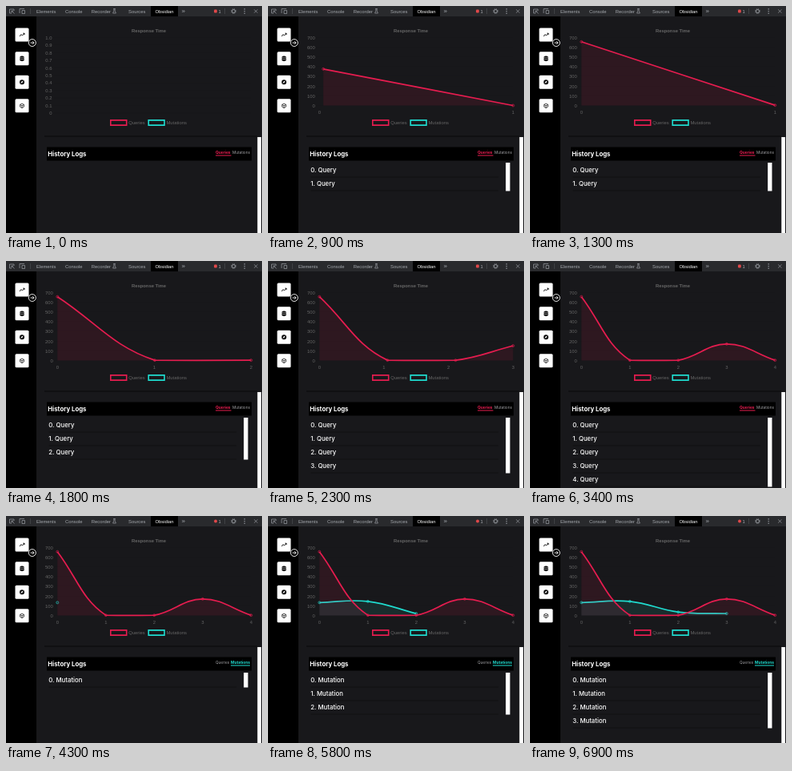
Write an HTML page that moves like this. It is 320 px wide and 284 px high and loops after 7 s.

```html
<!DOCTYPE html>
<html lang="en">
<head>
<meta charset="utf-8">
<title>Response time panel</title>
<style>
  html, body { margin: 0; width: 100%; height: 100%; overflow: hidden; background: #18181b; }
  svg { display: block; width: 320px; height: 284px; }
  text { font: 5.85px "Liberation Sans", Arial, sans-serif; fill: #666; white-space: pre; }
  .bar text { fill: #a4a8ad; }
  .bar .on { fill: #fff; }
  .log text { font: 500 7.8px Inter, sans-serif; fill: #fff; }
  .log .title { font-weight: 700; }
  .log .tab { font-size: 4.7px; font-weight: 400; fill: #a0a0a4; }
  .log .tab.on { font-size: 4.85px; font-weight: 700; fill: var(--c); }
  .mid { text-anchor: middle; }
  .end { text-anchor: end; }
  .line { fill: none; stroke: #a4a8ad; stroke-width: .65; }
  .icon { fill: none; stroke: #000; stroke-width: .9; }
</style>
</head>
<body>
<svg viewBox="0 0 320 284">
  <path d="M0 13H38V284H0z"/>
  <path fill="#08080a" d="M48 162.500H314V163.500H48z"/>

  <g class="bar">
    <path fill="#292a2d" d="M0 0H320V13H0z"/>
    <path d="M181 0H215V13H181z"/>
    <path class="line" d="M7 9H4.500V4H10V6M7 6L10.500 9.500M7 6V8.500M7 6H9.500M17 9V3.500H23M20 5.500H23.500V9.500H20z"/>
    <path stroke="#4a4c50" stroke-width=".7" d="M30.500 3V10M273.500 3V10"/>
    <text x="38" y="8.500">Elements</text>
    <text x="74" y="8.500">Console</text>
    <text x="106.800" y="8.500">Recorder</text>
    <path class="line" d="M134.200 3.500H136.800M134.900 3.500V6L133.600 9H137.400L136.100 6V3.500"/>
    <text x="153" y="8.500">Sources</text>
    <text x="186.500" y="8.500" class="on">Obsidian</text>
    <text x="219.500" y="8.600" style="font-size:8px">»</text>
    <g id="badge"></g>
    <text x="265.600" y="8.500">1</text>
    <circle class="line" cx="284.500" cy="6.500" r="2" style="stroke-width:.9"/>
    <circle class="line" cx="284.500" cy="6.500" r="3" stroke-dasharray="1.200 1.156"/>
    <path fill="#a4a8ad" d="M297.600 3.200h1.200v1.200h-1.200zM297.600 5.900h1.200v1.200h-1.200zM297.600 8.600h1.200v1.200h-1.200z"/>
    <path class="line" d="M310.200 4.400L314.400 8.600M314.400 4.400L310.200 8.600"/>
  </g>

  <g fill="#fff">
    <rect x="11.500" y="27.500" width="17" height="17" rx="1.500"/>
    <rect x="11.500" y="57.200" width="17" height="17" rx="1.500"/>
    <rect x="11.500" y="86.700" width="17" height="17" rx="1.500"/>
    <rect x="11.500" y="116.300" width="17" height="17" rx="1.500"/>
  </g>
  <path class="icon" d="M17 38L19 35.500L20.500 37L23 34.200M21.300 34.200H23V36"/>
  <path d="M17.300 63.500Q20 61.500 22.700 63.500V68Q20 70 17.300 68z"/>
  <path stroke="#fff" stroke-width=".5" fill="none" d="M17 64Q20 66 23 64M17 66Q20 68 23 66"/>
  <circle cx="20" cy="95.200" r="3"/>
  <path fill="#fff" d="M21.700 93.500L20.600 95.800L18.300 96.900L19.400 94.600z"/>
  <path class="icon" style="stroke-width:.7" d="M20 122L22.400 123.400V126.200L20 127.600L17.600 126.200V123.400zM17.600 123.400L20 124.800L22.400 123.400M20 124.800V127.600"/>
  <circle cx="32.800" cy="46" r="4.500" stroke="#fff" stroke-width=".9"/>
  <path fill="none" stroke="#fff" stroke-width=".9" d="M30.500 46H35M33.300 44.200L35.100 46L33.300 47.800"/>

  <text x="178.500" y="33.200" class="mid" style="font-weight:700">Response Time</text>
  <g id="chart"></g>
  <g fill="none" stroke-width="1.600">
    <path stroke="#e61c4f" d="M130.800 142.900H150.700V149.100H130.800z"/>
    <path stroke="#1fdccf" d="M178.200 142.900H198V149.100H178.200z"/>
  </g>
  <text x="153.200" y="148.200">Queries</text>
  <text x="200.500" y="148.200">Mutations</text>

  <g class="log">
    <path d="M51 176.500H307V193.500H51z"/>
    <text x="52.300" y="187.800" class="title">History Logs</text>
    <g id="log"></g>
  </g>
  <path fill="#fff" d="M314.300 164H319V284H314.300z"/>
</svg>

<script>
const LOOP = 7000, DURATION = 520;
const TOP = 39.2, BASE = 124.5, RIGHT = 306.3;
const RED = '#e61c4f', TEAL = '#1fdccf';
const queries = [655, 3, 3, 170, 3];
const mutations = [133, 145, 36, 24];

// start time, number of queries, number of mutations
const steps = [
  [-DURATION, 0, 0], [90, 1, 0], [890, 2, 0], [1420, 3, 0], [2080, 4, 0],
  [2712, 5, 0], [3850, 5, 1], [4880, 5, 2], [5705, 5, 3], [6705, 5, 4]
];

const $ = id => document.getElementById(id);
const clamp = (v, lo, hi) => Math.min(hi, Math.max(lo, v));
const mix = (a, b, p) => a + (b - a) * p;
const text = (x, y, s, cls = '') => `<text x="${x}" y="${y}" class="${cls}">${s}</text>`;

function place(value, i, labels) {
  const left = labels === 1 ? 69.6 : 64.3;
  const [min, max] = labels === 1 ? [654, 656] : [0, 700];
  return {
    x: left + i * (RIGHT - left) / Math.max(labels - 1, 1),
    y: mix(BASE, TOP, (value - min) / (max - min))
  };
}

function points(values, count, oldCount, labels, oldLabels, p) {
  return values.slice(0, count).map((value, i) => {
    const to = place(value, i, labels);
    let from = { x: to.x, y: BASE };
    if (i < oldCount) from = place(value, i, oldLabels);
    else if (i === 4) from.y = place(values[3], 3, labels).y;
    return { x: mix(from.x, to.x, p), y: mix(from.y, to.y, p) };
  });
}

// Control points before and after each point, for a spline of tension 0.4
function handles(pts) {
  return pts.map((c, i) => {
    const a = pts[i - 1] || c, b = pts[i + 1] || c;
    const da = Math.hypot(c.x - a.x, c.y - a.y), db = Math.hypot(b.x - c.x, b.y - c.y);
    const k = 0.4 / (da + db || 1);
    const at = d => `${c.x + d * (b.x - a.x)} ${clamp(c.y + d * (b.y - a.y), TOP, BASE)}`;
    return [at(-k * da), at(k * db)];
  });
}

function series(pts, color) {
  if (!pts.length) return '';
  const h = handles(pts);
  const line = pts.map((c, i) => i
    ? `C${h[i - 1][1]} ${h[i][0]} ${c.x} ${c.y}`
    : `M${c.x} ${c.y}`).join('');
  const area = `${line}L${pts[pts.length - 1].x} ${BASE}L${pts[0].x} ${BASE}z`;
  const dots = pts.map(c =>
    `<circle cx="${c.x}" cy="${c.y}" r="1.5" fill="${color}" fill-opacity=".1" stroke="${color}" stroke-width=".6"/>`);
  return `<path d="${area}" fill="${color}" fill-opacity=".1"/>` +
    `<path d="${line}" fill="none" stroke="${color}" stroke-width="1.7"/>` + dots.join('');
}

function axes(labels) {
  const count = labels < 2 ? 10 : 7;
  const bottom = labels ? BASE : 134;
  const edge = [57.4, 63.6][labels] || 58.7;
  let out = '';
  for (let i = 0; i <= count; i++) {
    const y = mix(bottom, TOP, i / count);
    const label = labels > 1 ? i * 100 : labels ? (654 + i / 5).toFixed(1) : i ? (i / 10).toFixed(1) : 0;
    out += `<path d="M${edge + 1} ${y}H${RIGHT}" stroke="#000" stroke-opacity=".1" stroke-width=".5"/>`;
    out += text(edge, y + 2.4, label, 'end');
  }
  for (let i = 0; i < labels; i++) out += text(place(0, i, labels).x, 135.2, i, 'mid');
  return out;
}

function log(q, m) {
  const rows = m || q, kind = m ? 'Mutation' : 'Query';
  const color = m ? TEAL : RED;
  let out = `<g style="--c:${color}">` +
    text(262, 184.7, 'Queries', m ? 'tab' : 'tab on') +
    text(m ? 281 : 283, 184.7, 'Mutations', m ? 'tab on' : 'tab') + '</g>' +
    `<path d="M${m ? '281 187H305' : '262 187H281.5'}" stroke="${color}"/>`;
  for (let i = 0; i < rows; i++) {
    const y = 17 * i;
    out += text(53.3, 208 + y, `${i}. ${kind}`) +
      `<path d="M53.500 ${214 + y}H288" stroke="#0c0c0e" stroke-width=".7"/>`;
  }
  return out + `<path fill="#fff" d="M297.200 196H302.500V${196 + (rows && rows * 17 + 1.5)}H297.200z"/>`;
}

let shown = -1;

function draw(now) {
  const t = now % LOOP;
  const index = steps.findLastIndex(s => s[0] <= t);
  const [start, q, m] = steps[index];
  const [, oldQ, oldM] = steps[Math.max(index - 1, 0)];
  const p = 1 - (1 - clamp((t - start) / DURATION, 0, 1)) ** 4;

  if (index !== shown) {
    shown = index;
    $('log').innerHTML = log(q, m);
    $('badge').innerHTML = m
      ? '<circle cx="262" cy="6.500" r="2" fill="#e0484a"/>'
      : '<rect x="260" y="4.600" width="3.800" height="3.800" rx="1" fill="#e0484a"/>';
  }
  $('chart').innerHTML = axes(q) +
    series(points(mutations, m, oldM, q, oldQ, p), TEAL) +
    series(points(queries, q, oldQ, q, oldQ, p), RED);
  requestAnimationFrame(tick);
}

const origin = performance.now();
function tick() { draw(performance.now() - origin); }
tick();
</script>
</body>
</html>
```
